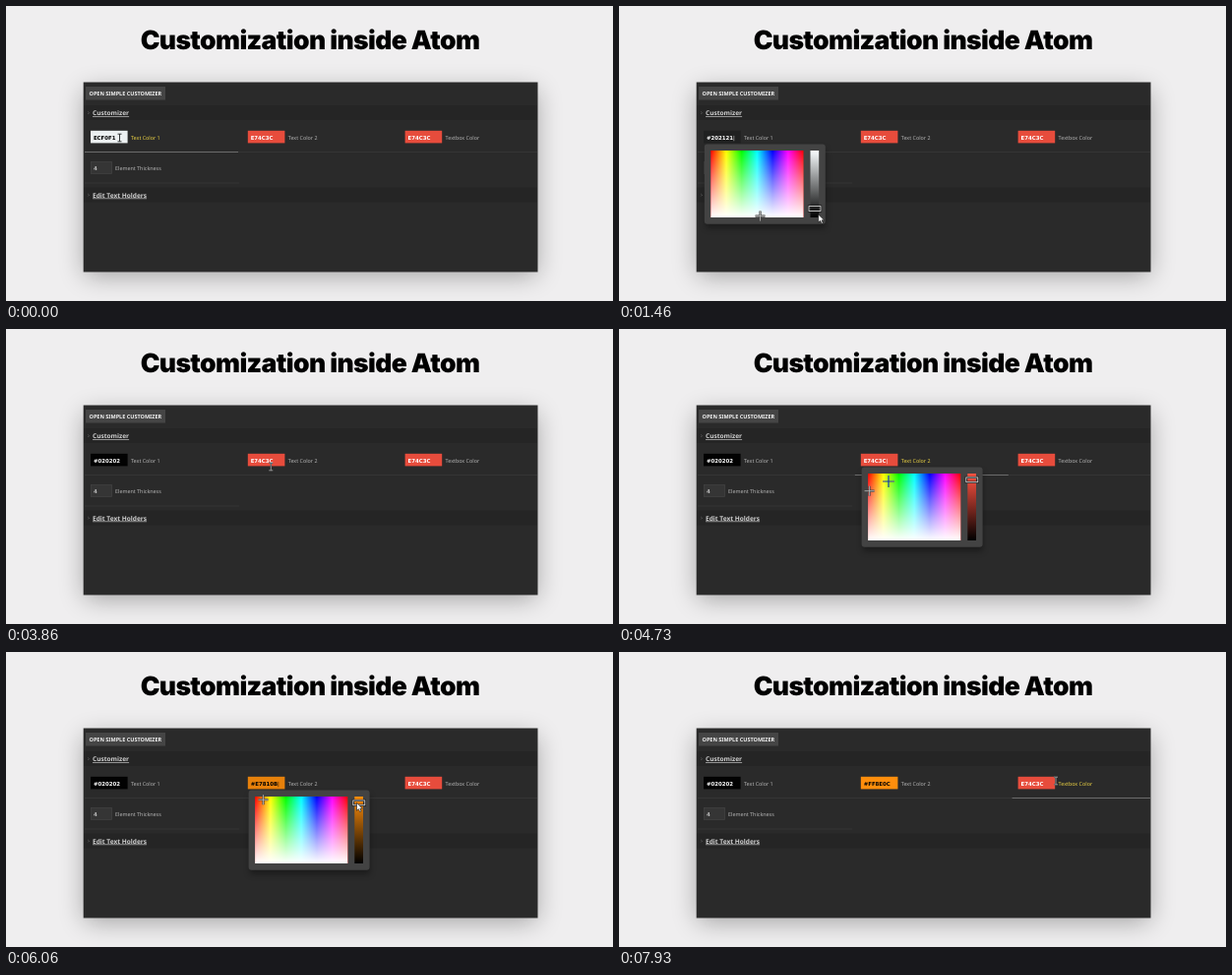
Write an HTML page that moves like this. It is 617 by 300 pixels and loops after 8 s.

```html
<!DOCTYPE html>
<html lang="en">
<head>
<meta charset="utf-8">
<title>Customization inside Atom</title>
<style>
  html, body { margin: 0; width: 100%; height: 100%; overflow: hidden; background: #efeeef; }
  svg { display: block; width: 617px; height: 300px; text-rendering: geometricPrecision; }
  text { font-family: "Noto Sans", sans-serif; }
  .title { font: 900 26.5px Inter, sans-serif; letter-spacing: -.62px; }
  .button { font-size: 5.5px; font-weight: 700; fill: #f4f4f4; }
  .heading { font-size: 6.55px; font-weight: 600; fill: #d0d0d0; text-decoration: underline; }
  .label { font-size: 5.38px; font-weight: 500; fill: #b4b4b4; }
  .label.active { fill: #ecd244; }
  .value { font: 700 5.4px "DejaVu Sans", sans-serif; }
  .caret { font-weight: 400; }
  .invert { mix-blend-mode: difference; fill: none; stroke: #ccc; }
</style>
</head>
<body>
<svg viewBox="0 0 617 300">
  <defs>
    <linearGradient id="hues"></linearGradient>
    <linearGradient id="whiten" x2="0" y2="1">
      <stop stop-color="#fff" stop-opacity="0"/><stop offset="1" stop-color="#fff"/>
    </linearGradient>
    <filter id="soft" x="-20%" y="-30%" width="140%" height="170%"><feGaussianBlur stdDeviation="13"/></filter>
    <filter id="near" x="-20%" y="-20%" width="140%" height="150%"><feGaussianBlur stdDeviation="3"/></filter>
  </defs>
  <rect width="617" height="300" fill="#efeeef"/>
  <text class="title" x="309" y="44" text-anchor="middle">Customization inside Atom</text>
  <rect x="80" y="86" width="459" height="188" opacity=".33" filter="url(#soft)"/>
  <rect x="78.7" y="77.5" width="461.8" height="193" fill="#2a2a2a"/>
  <rect x="81" y="82" width="81" height="13.5" fill="#454545"/>
  <text class="button" x="84.5" y="91">OPEN SIMPLE CUSTOMIZER</text>
  <path d="M79 101h461v15H79zM79 184.5h461v15H79z" fill="#252525"/>
  <path d="M83.3 107.5l1.2 1.2-1.2 1.2M83.3 191l1.2 1.2-1.2 1.2" fill="none" stroke="#777" stroke-width=".6"/>
  <text class="heading" x="88" y="111">Customizer</text>
  <text class="heading" x="88" y="194.5">Edit Text Holders</text>
  <path d="M80 148.5H540M80 180H237" stroke="#353535"/>
  <rect x="86.5" y="158.5" width="21" height="12" fill="#353535" stroke="#414141" stroke-width=".8"/>
  <text class="value" x="89" y="166.8" fill="#bbb">4</text>
  <text class="label" x="111" y="166.7">Element Thickness</text>
  <g id="live"></g>
</svg>
<script>
const LOOP = 8000, TRAVEL = 600, LAG = 67, COLUMN = 159.8;
const PALETTE = { x: 93.3, y: 147, w: 94.2, h: 68 };
const live = document.getElementById('live');
const clamp = (v, low, high) => Math.max(low, Math.min(high, v));

document.getElementById('hues').innerHTML = [0, 1, 2, 3, 4, 5, 6].map(i =>
  `<stop offset="${i / 6}" stop-color="hsl(${i * 60 % 360},100%,50%)"/>`).join('');

const red = { h: 5.6, s: .74, v: 231.2 };
const fields = [
  { label: 'Text Color 1', color: { h: 192, s: .0207, v: 241.1 } },
  { label: 'Text Color 2', color: red },
  { label: 'Textbox Color', color: red }
];

// The pointer leaves for each stop at its time; everything else follows from where it is.
const home = { x: 115.5, y: 134 };
const stops = [
  { at: 300, x: 202.7, y: 150.3, opens: 0 },
  { at: 930, x: 202.7, y: 214.41, drags: 'slider' },
  { at: 1730, x: 102, y: 212 },
  { at: 2450, x: 150, y: 247, closes: true },
  { at: 3345, x: 276, y: 134 },
  { at: 4130, x: 274, y: 155, opens: 1 },
  { at: 4820, x: 261.53, y: 150.26, drags: 'palette' },
  { at: 5430, x: 356.5, y: 153.35 },
  { at: 6040, x: 356.5, y: 147, drags: 'slider' },
  { at: 6640, x: 400, y: 250, closes: true },
  { at: 7240, x: 444, y: 131 }
];

function pointerAt(t) {
  const i = stops.findLastIndex(stop => t >= stop.at);
  if (i < 0) return home;
  const from = stops[i - 1] || home, to = stops[i];
  const p = Math.min(1, (t - to.at) / TRAVEL), e = p * p * (3 - 2 * p);
  return { x: from.x + (to.x - from.x) * e, y: from.y + (to.y - from.y) * e };
}

function stateAt(t) {
  const colors = fields.map(f => ({ ...f.color, picked: false }));
  let open = -1;
  for (const stop of stops) {
    if (t < stop.at) break;
    if ('opens' in stop) open = stop.opens;
    if (stop.drags) {
      const { x, y } = pointerAt(clamp(t - LAG, stop.at, stop.at + TRAVEL));
      const level = clamp(1 - (y - PALETTE.y) / PALETTE.h, 0, 1), color = colors[open];
      color.picked = true;
      if (stop.drags === 'slider') color.v = 255 * level;
      else Object.assign(color, { h: (x - PALETTE.x - open * COLUMN) / PALETTE.w * 360, s: level });
    }
    if (stop.closes && t >= stop.at + TRAVEL) open = -1;
  }
  return { colors, open };
}

function rgb({ h, s, v }) {
  return [5, 3, 1].map(n => {
    const k = (n + h / 60) % 6;
    return Math.floor(v - v * s * clamp(Math.min(k, 4 - k), 0, 1));
  });
}
const hexOf = color => rgb(color).map(c => c.toString(16).padStart(2, '0')).join('').toUpperCase();

function inkFor(color) {
  const [r, g, b] = rgb(color);
  return .213 * r + .715 * g + .072 * b < 127 ? '#fff' : '#000';
}

const overField = ({ x, y }, i, reach) =>
  Math.abs(x - 105 - i * COLUMN) < 20 && Math.abs(y - 133) < reach;

function drawField(field, i, color, isOpen, hovered) {
  const hex = hexOf(color), active = hovered || isOpen && !color.picked;
  const lineEnd = Math.min(236, 540 - i * COLUMN);
  return `<g transform="translate(${i * COLUMN})">
    ${active ? `<path d="M80 148.5H${lineEnd}" stroke="#6c6c6c"/>` : ''}
    <rect x="86" y="126.8" width="37.6" height="12.6" fill="#${hex}"/>
    <text class="value" x="88.9" y="135.6" fill="${inkFor(color)}">${color.picked ? '#' : ''}${hex}${isOpen ? '<tspan class="caret">|</tspan>' : ''}</text>
    <text class="label${active ? ' active' : ''}" x="127" y="135.5">${field.label}</text>
  </g>`;
}

function drawPicker(i, color) {
  const { x, y, w, h } = PALETTE;
  const markX = x + color.h / 360 * w, markY = y + (1 - color.s) * h;
  const thumbY = y + (1 - color.v / 255) * h;
  const box = `x="${x}" y="${y}" width="${w}" height="${h}"`;
  const cross = `M${markX - 5} ${markY}h10M${markX} ${markY - 5}v10`;
  const thumb = `<rect x="193" y="${thumbY - 2.4}" width="12" height="4.8" fill="none"`;
  return `<g transform="translate(${i * COLUMN})">
    <linearGradient id="shade" x2="0" y2="1"><stop stop-color="#${hexOf({ ...color, v: 255 })}"/><stop offset="1"/></linearGradient>
    <rect x="88" y="145" width="122" height="81" opacity=".35" filter="url(#near)"/>
    <rect x="86.8" y="140.5" width="123" height="81.3" rx="3" fill="#434343"/>
    <rect ${box} fill="url(#hues)"/><rect ${box} fill="url(#whiten)"/>
    <path d="${cross}" stroke="#444" stroke-width="2.2"/><path d="${cross}" stroke="#ccc" stroke-width=".7"/>
    <rect x="194.5" y="${y}" width="8.7" height="${h}" fill="url(#shade)"/>
    ${thumb} stroke="#111" stroke-width="2.2"/>${thumb} stroke="#ddd" stroke-width=".9"/>
  </g>`;
}

function drawPointer({ x, y }, open) {
  const left = PALETTE.x + open * COLUMN;
  const overPalette = open >= 0 && x > left && x < left + PALETTE.w &&
    y > PALETTE.y && y < PALETTE.y + PALETTE.h;
  const overText = fields.some((_, i) => overField({ x, y }, i, 8));
  const shape = overPalette ? '<path class="invert" d="M-6 0H6M0-6V6" stroke-width="1.2"/>'
    : overText ? '<path class="invert" d="M-2-3.8H2M0-3.8V3.8M-2 3.8H2" stroke-width=".9"/>'
    : '<path d="M0 0V8L1.9 6.3 3.2 9.2 4.6 8.6 3.4 5.8H5.8Z" fill="#fff" stroke="#111" stroke-width=".6"/>';
  const blend = overPalette || overText ? 'difference' : 'normal';
  return `<g transform="translate(${x} ${y})" style="mix-blend-mode:${blend}">${shape}</g>`;
}

function render(now) {
  const t = now % LOOP, { colors, open } = stateAt(t), seen = pointerAt(t - LAG);
  live.innerHTML =
    fields.map((f, i) => drawField(f, i, colors[i], i === open, overField(seen, i, 6.2))).join('') +
    (open < 0 ? '' : drawPicker(open, colors[open])) +
    drawPointer(pointerAt(t), open);
  requestAnimationFrame(render);
}
render(0);
</script>
</body>
</html>
```
